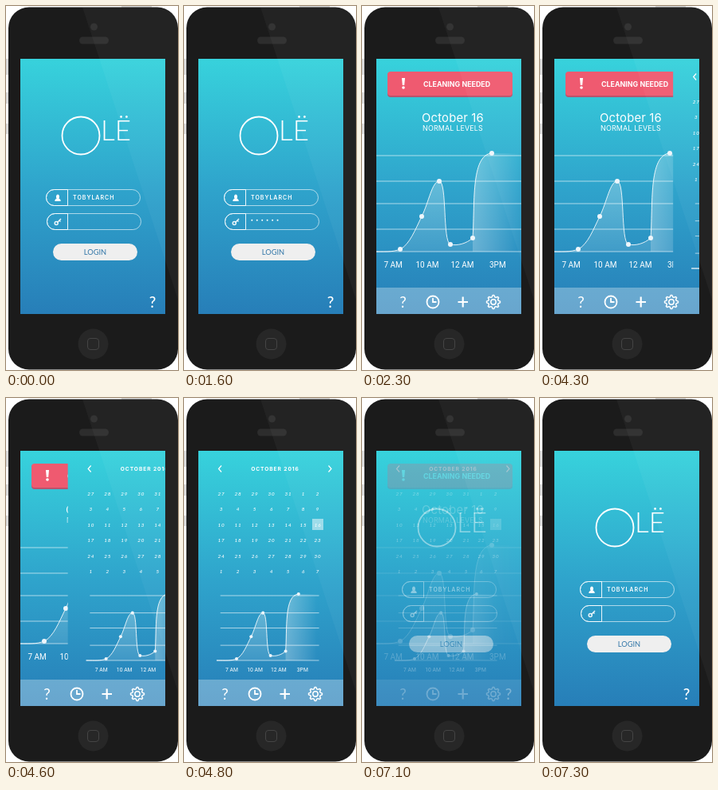
Recreate the animation shown at these times as an HTML page. Size 216x455 px, loop 8300 ms.

```html
<!DOCTYPE html>
<html lang="en">
<head>
<meta charset="utf-8">
<title>Phone app walkthrough</title>
<style>
html, body { margin: 0; width: 100%; height: 100%; overflow: hidden; background: #fff; }
svg { display: block; font-family: Inter, "Open Sans", sans-serif; }
text { fill: #fff; }
.mid { text-anchor: middle; }
.lato { font-family: Lato, sans-serif; }
.line { fill: none; stroke: #fff; vector-effect: non-scaling-stroke; }
.days text { font: italic 500 6.3px Lato, sans-serif; letter-spacing: .8px; text-anchor: middle; }
.hours text { font: 10px Roboto, sans-serif; }
</style>
</head>
<body>
<svg width="216" height="455" viewBox="0 0 216 455">
  <defs>
    <linearGradient id="sky" gradientUnits="userSpaceOnUse" x1="0" y1="66" x2="0" y2="386">
      <stop stop-color="#37d2dc"/><stop offset=".5" stop-color="#2fa4cc"/><stop offset="1" stop-color="#277eb8"/>
    </linearGradient>
    <linearGradient id="hill" gradientUnits="userSpaceOnUse" x1="0" y1="184" x2="0" y2="307">
      <stop stop-color="#fff" stop-opacity=".32"/><stop offset="1" stop-color="#fff" stop-opacity=".1"/>
    </linearGradient>
    <linearGradient id="haze" gradientUnits="userSpaceOnUse" x1="139" y1="0" x2="197" y2="0">
      <stop stop-color="#fff" stop-opacity=".3"/><stop offset=".45" stop-color="#fff" stop-opacity=".17"/><stop offset="1" stop-color="#fff" stop-opacity="0"/>
    </linearGradient>
    <clipPath id="screen"><rect x="18" y="66" width="182" height="319"/></clipPath>

    <g id="graph">
      <g id="rules" class="line" stroke-opacity=".6"></g>
      <path fill="url(#hill)" d="M11 307C28 307 38 308 48 304C60 298 67 279 75 263C84 245 88 219 97 219C107 219 101 295 111 298C120 300 131 297 139 290V307Z"/>
      <path fill="url(#haze)" d="M139 290C142 250 136 186 163 184H197V307H139Z"/>
      <path class="line" stroke-opacity=".85" d="M11 307C28 307 38 308 48 304C60 298 67 279 75 263C84 245 88 219 97 219C107 219 101 295 111 298C120 300 131 297 139 290C142 250 136 186 163 184"/>
      <g id="knots" fill="#eef6fb"></g>
      <g class="hours">
        <text x="27.5" y="327">7 AM</text><text x="67.5" y="327">10 AM</text>
        <text x="111.5" y="327">12 AM</text><text x="160" y="327">3PM</text>
      </g>
    </g>
  </defs>

  <!-- phone body -->
  <g fill="#d9d9d9">
    <rect x="145" width="38" height="4"/>
    <rect y="66" width="5" height="20"/><rect y="108" width="5" height="14"/><rect y="147" width="5" height="13"/>
  </g>
  <rect x="3" y="1.500" width="213" height="453" rx="26" fill="#1b1b1b"/>
  <circle cx="110.500" cy="26" r="4.500" fill="#2d2d2d"/>
  <rect x="92" y="38.500" width="37" height="9" rx="4.500" fill="#2d2d2d"/>
  <circle cx="109.500" cy="422.500" r="19" fill="#272727"/>
  <rect x="102.500" y="415.500" width="14" height="14" rx="3.500" fill="none" stroke="#444"/>

  <g clip-path="url(#screen)">
    <!-- login -->
    <rect x="18" y="66" width="183" height="320" fill="url(#sky)"/>
    <circle cx="94" cy="162" r="23.500" class="line" stroke-width="1.800"/>
    <text class="lato" x="119" y="167.500" font-size="35" font-weight="300">LË</text>
    <g class="line" stroke-opacity=".6">
      <rect x="50.500" y="229.500" width="118" height="20" rx="10"/>
      <rect x="51.500" y="259.500" width="118" height="20" rx="10"/>
    </g>
    <g class="line" stroke-opacity=".9">
      <path d="M77.500 229.500H60.500a10 10 0 0 0 0 20H77.500Z"/>
      <path d="M77.500 259.500H61.500a10 10 0 0 0 0 20H77.500Z"/>
      <path d="M64.500 270.500L69 266M67 268l1.500 1.500" stroke-width="1.500"/>
      <circle cx="63.200" cy="271.500" r="2" stroke-width="1.500"/>
    </g>
    <path fill="#fff" d="M65 235.500a2.200 2.800 0 0 1 1.300 4.900q2.500.7 2.500 3.600H61.200q0-2.900 2.500-3.600A2.200 2.800 0 0 1 65 235.500Z"/>
    <text x="84" y="242" font-size="7" font-weight="600" letter-spacing="1">TOBYLARCH</text>
    <g id="dots" fill="#fff"></g>
    <g id="touch">
      <rect x="59" y="297" width="106" height="21" rx="10.500" fill="#efefef"/>
      <text class="mid lato" x="112" y="311" font-size="9.300" style="fill:#3377a8">LOGIN</text>
      <text class="mid lato" x="184" y="376.500" font-size="19" font-weight="500">?</text>
    </g>

    <!-- daily levels -->
    <g id="today">
      <rect x="18" y="66" width="183" height="320" fill="url(#sky)"/>
      <rect x="32" y="83" width="157" height="31" rx="4" fill="#b9536d"/>
      <rect x="32" y="82" width="157" height="30" rx="4" fill="#ef5a70"/>
      <path d="M50 90h4l-.8 9h-2.400Z" fill="#fff"/><circle cx="52" cy="102" r="1.800" fill="#fff"/>
      <text x="77" y="101" font-size="8.900" font-weight="700">CLEANING NEEDED</text>
      <text class="mid" x="114" y="145" font-size="14.800" letter-spacing=".2">October 16</text>
      <text class="mid" x="114" y="156" font-size="8.900" letter-spacing=".2">NORMAL LEVELS</text>
      <use href="#graph"/>
    </g>

    <!-- month view -->
    <g id="month">
      <rect x="18" y="66" width="183" height="320" fill="url(#sky)"/>
      <path class="line" stroke-width="1.200" d="M47 84.500L43.500 88.500L47 92.500M181.500 84.500L185 88.500L181.500 92.500"/>
      <text class="mid" x="114.500" y="91" font-size="6.700" font-weight="700" letter-spacing=".9">OCTOBER 2016</text>
      <rect x="161" y="151" width="14" height="14" fill="#fff" fill-opacity=".5"/>
      <g id="days" class="days"></g>
      <use href="#graph" transform="translate(33.500 120.800) scale(.677 .675)"/>
    </g>

    <!-- tool bar -->
    <g id="bar">
      <rect x="18" y="352" width="183" height="34" fill="url(#sky)"/>
      <rect x="18" y="352" width="183" height="34" fill="#fff" fill-opacity=".3"/>
      <text class="mid lato" x="51.500" y="376.500" font-size="19">?</text>
      <g class="line" stroke-width="1.800">
        <circle cx="89" cy="370" r="7.500"/><path d="M89 365v5h4.500"/>
        <path d="M120.500 370h12.500M126.700 363.500v13" stroke-width="2.200"/>
        <path id="gear" stroke-width="1.500" stroke-linejoin="round"/>
        <circle cx="165" cy="370" r="3.200" stroke-width="1.500"/>
      </g>
    </g>
  </g>

  <!-- glass shine -->
  <path d="M96 1.500H190Q216 1.500 216 27.500V367Z" fill="#fff" fill-opacity=".035"/>
</svg>
<script>
const $ = id => document.getElementById(id);
const LOOP = 8300;

$('rules').innerHTML = [187, 219, 247, 279, 307]
  .map(y => `<path class="line" d="M${y > 300 ? 11 : 18} ${y}H201"/>`).join('');
$('knots').innerHTML = [[48, 304], [75, 263], [97, 219], [111, 298], [139, 290], [163, 184]]
  .map(([x, y]) => `<circle cx="${x}" cy="${y}" r="3"/>`).join('');
$('dots').innerHTML = Array.from({ length: 6 }, (_, i) =>
  `<circle cx="${85.3 + 6.45 * i}" cy="267.7" r="1"/>`).join('');

const columns = [47, 68, 89, 110, 131, 150, 168];
const dayName = i => i < 5 ? 27 + i : i < 35 ? i - 4 : i - 34;
$('days').innerHTML = Array.from({ length: 42 }, (_, i) =>
  `<text x="${columns[i % 7]}" y="${121.8 + 19.5 * Math.floor(i / 7)}">${dayName(i)}</text>`).join('');

// eight teeth, four corners each
$('gear').setAttribute('d', 'M' + Array.from({ length: 32 }, (_, i) => {
  const a = (i - 1.5) * Math.PI / 16, r = i % 4 === 1 || i % 4 === 2 ? 8.5 : 6.4;
  return [165 + r * Math.cos(a), 370 + r * Math.sin(a)].map(v => v.toFixed(2));
}).join('L') + 'Z');

const dots = [...$('dots').children];

function draw(now) {
  const t = now % LOOP;
  // six hard steps of 100 ms, the first one at once
  const steps = from => Math.max(0, Math.min(6, Math.floor((t - from) / 100) + 1)) / 6;
  const shown = steps(1800) - steps(6800);
  const slide = steps(4300);

  dots.forEach((dot, i) => dot.style.opacity = t >= 200 * (i + 1) && t < 4300 ? 1 : 0);
  $('touch').style.opacity = t >= 1400 && t < 1600 ? .7 : 1;
  for (const id of ['today', 'month', 'bar']) $(id).style.opacity = shown;
  $('month').setAttribute('transform', `translate(${slide ? 179 * (1 - slide) : 200})`);
}

const start = performance.now();
function tick() {
  draw(performance.now() - start);
  requestAnimationFrame(tick);
}
draw(0);
requestAnimationFrame(tick);
</script>
</body>
</html>
```
